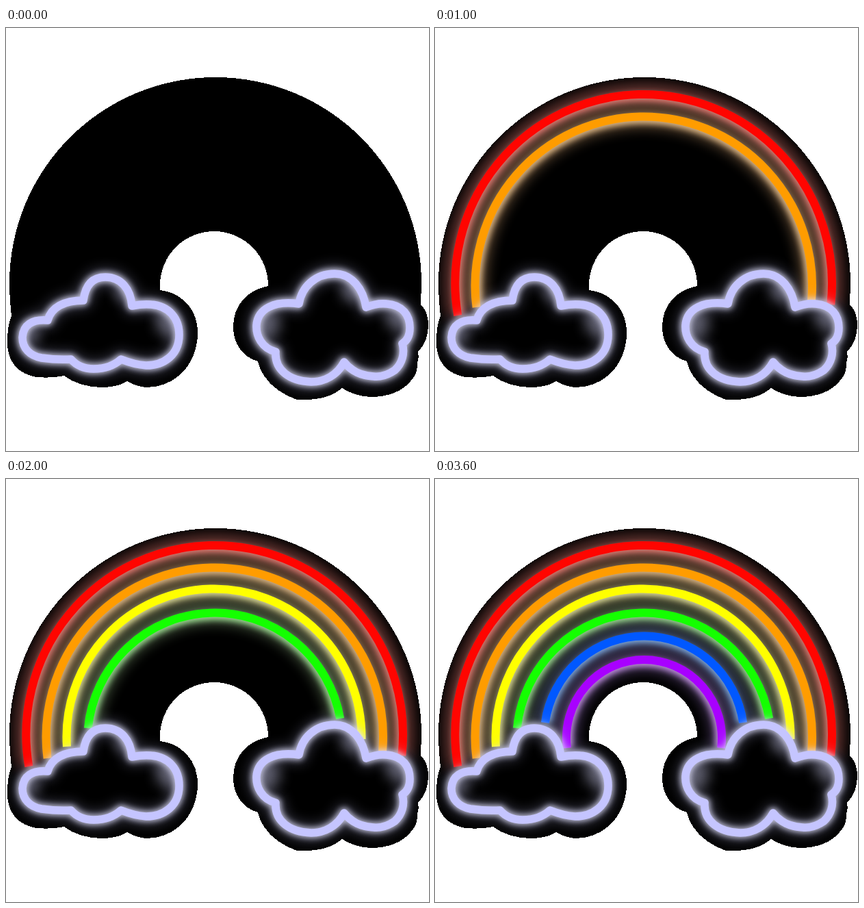
An HTML page for the animation above (4 s loop, 618x618 px).

```html
<!DOCTYPE html>
<html lang="en">
<head>
<meta charset="utf-8">
<title>Neon rainbow</title>
<style>
html, body { margin: 0; width: 100%; height: 100%; overflow: hidden; background: #fff; }
svg { display: block; width: 100vw; height: 100vh; }
path { stroke-linejoin: round; }
</style>
</head>
<body>
<svg viewBox="0 0 618 618" fill="none">
  <defs>
    <path id="board" d="M8 421 C6 405 5 390 5 373 A301 301 0 0 1 607 373 L606 404
      C614 412 617 422 617 434 C617 450 612 463 602 473 C603 480 603 484 601 489 C602 499 599 508 591 516
      C580 530 560 539 532 539 C515 538 502 533 491 526 C476 539 457 544 425 543
      C399 534 374 515 368 487 C346 481 332 461 332 437 C332 405 352 383 383 377
      A79 79 0 0 0 225 375 L225 383 C258 387 280 412 280 445 C280 490 249 525 205 525
      C194 524 185 521 177 516 C166 523 153 525 138 525 C117 524 99 519 85 508
      C71 511 58 511 45 510 C18 506 2 487 2 461 C2 444 3 432 8 421 Z"/>
    <path id="left" d="M113 398 C116 375 127 364 145 364 C168 364 182 381 184 406
      C194 404 203 403 212 404 C238 406 253 424 253 448 C253 478 230 493 205 493
      C190 492 178 488 168 484 C158 493 145 498 128 498 C112 498 102 492 95 484
      C80 485 66 484 52 482 C35 479 24 468 24 452 C25 434 38 425 61 427
      C66 408 85 398 113 398 Z"/>
    <path id="right" d="M428 403 C432 378 452 359 480 359 C506 359 522 382 526 408
      C536 404 548 402 556 403 C580 405 590 420 590 438 C590 450 586 457 579 461
      C583 475 579 490 568 500 C556 508 545 510 537 509 C518 508 504 501 494 488
      C484 507 466 517 446 517 C415 516 392 500 394 473 C374 468 365 450 366 434
      C368 410 392 398 428 403 Z"/>
    <g id="clouds"><use href="#left"/><use href="#right"/></g>
    <clipPath id="inside"><use href="#board"/></clipPath>
    <clipPath id="hollow"><use href="#left"/><use href="#right"/></clipPath>
    <filter id="soft" filterUnits="userSpaceOnUse" x="-40" y="-40" width="700" height="700" color-interpolation-filters="sRGB">
      <feGaussianBlur stdDeviation="4"/>
    </filter>
    <filter id="wide" filterUnits="userSpaceOnUse" x="-40" y="-40" width="700" height="700" color-interpolation-filters="sRGB">
      <feGaussianBlur stdDeviation="9"/>
    </filter>
  </defs>
  <use href="#board" fill="#000" shape-rendering="crispEdges"/>
  <g clip-path="url(#inside)">
    <g id="glows"></g>
    <g id="tubes"></g>
    <use href="#clouds" fill="#000" fill-opacity=".93"/>
    <use href="#clouds" stroke="#cfcfff" stroke-width="26" opacity=".25" filter="url(#wide)"/>
    <g clip-path="url(#hollow)">
      <g fill="#c8c8e8" opacity=".4" filter="url(#wide)">
        <circle cx="240" cy="430" r="22"/>
        <circle cx="172" cy="386" r="13"/>
        <circle cx="38" cy="447" r="12"/>
        <circle cx="382" cy="433" r="20"/>
        <circle cx="506" cy="384" r="17"/>
        <circle cx="572" cy="424" r="18"/>
      </g>
    </g>
    <use href="#clouds" stroke="#e2e2ff" stroke-width="15" opacity=".85" filter="url(#soft)"/>
    <use href="#clouds" stroke="#c5c5ff" stroke-width="11.5"/>
  </g>
</svg>
<script>
const STEP = 500, LOOP = 4000;

// centre x, radius, top, left end y, right end y, tube, near glow, far glow
const bands = [
  [304.7, 275.3, 97, 420, 404, '#ff0500', '#ff8c84', '#d8746c'],
  [304.8, 246.2, 129.5, 408, 398, '#ff9c00', '#ffd49c', '#d0a070'],
  [304, 215.5, 160.5, 391, 380, '#ffff00', '#ffffb0', '#c8b880'],
  [305, 186, 195.5, 364, 350, '#14ff00', '#b4ffa8', '#90b080'],
  [305.5, 146, 229.5, 356, 356, '#0058ff', '#90c4ff', '#7080b8'],
  [305.5, 113.5, 264, 393, 393, '#a800ff', '#dca4ff', '#9070b8']
];

function arc(cx, r, top, leftY, rightY) {
  const ry = r + 1, cy = top + ry;
  const reach = y => r * Math.sqrt(1 - ((y - cy) / ry) ** 2);
  const large = leftY + rightY > 2 * cy ? 1 : 0;
  return `M${cx - reach(leftY)} ${leftY} A${r} ${ry} 0 ${large} 1 ${cx + reach(rightY)} ${rightY}`;
}

function add(parent, attrs) {
  const path = document.createElementNS('http://www.w3.org/2000/svg', 'path');
  for (const key in attrs) path.setAttribute(key, attrs[key]);
  document.getElementById(parent).append(path);
  return path;
}

const lights = bands.map(([cx, r, top, leftY, rightY, tube, near, far]) => {
  const line = arc(cx, r, top, leftY, rightY);
  const inner = arc(cx, r - 3, top + 4, leftY, rightY);
  return [
    add('glows', { d: line, stroke: far, 'stroke-width': 34, opacity: 0.42, filter: 'url(#wide)' }),
    add('glows', { d: inner, stroke: near, 'stroke-width': 13, opacity: 0.8, filter: 'url(#soft)' }),
    add('tubes', { d: line, stroke: tube, 'stroke-width': 12 })
  ];
});

function draw(t) {
  const lit = Math.floor(t / STEP);
  lights.forEach((parts, i) => {
    for (const part of parts) part.style.display = i < lit ? '' : 'none';
  });
}

const start = performance.now();
function tick() {
  draw((performance.now() - start) % LOOP);
  requestAnimationFrame(tick);
}
tick();
</script>
</body>
</html>
```
